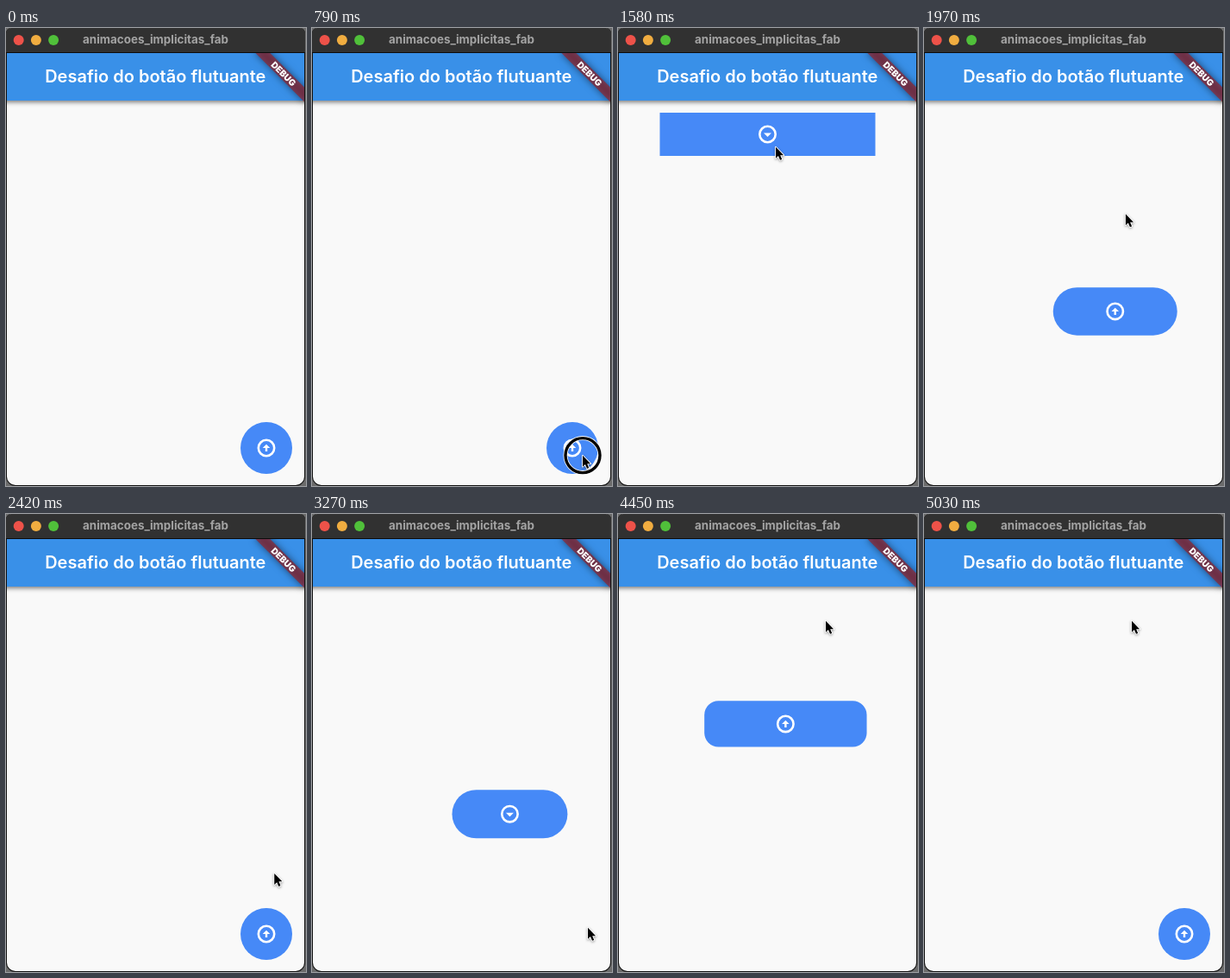
Animation, 348 px wide and 530 px high, one loop 5.06 s. Source, as an HTML page with a canvas:

```html
<!DOCTYPE html>
<html lang="pt">
<head>
<meta charset="utf-8">
<title>Botão flutuante</title>
<style>
  html, body { margin: 0; width: 100%; height: 100%; overflow: hidden; background: #6b6b6b; }
  canvas { display: block; width: 348px; height: 530px; }
</style>
</head>
<body>
<canvas id="stage"></canvas>
<script>
const W = 348, H = 530, LOOP = 5060, MOVE = 450, PRESS = 75;
const BAR = '#3990e8', BUTTON = '#4689f7';

// Each tap: where it lands, when the pointer sets out and arrives, when the button reacts.
const taps = [
  { x: 314, y: 494, leave: 120, arrive: 680, at: 825 },
  { x: 183, y: 137, leave: 1000, arrive: 1540, at: 1720 },
  { x: 320, y: 478, leave: 1850, arrive: 2850, at: 3096 },
  { x: 241, y: 123, leave: 3730, arrive: 4170, at: 4305 }
];
const entry = { x: 352, y: 462 };

const canvas = document.getElementById('stage');
const ctx = canvas.getContext('2d');
const dpr = window.devicePixelRatio || 1;
canvas.width = W * dpr;
canvas.height = H * dpr;

const mix = (a, b, p) => a + (b - a) * p;
const span = (t, a, b) => Math.min(1, Math.max(0, (t - a) / (b - a)));
const easeOut = p => 1 - (1 - p) ** 2;

function disc(x, y, r, color) {
  ctx.fillStyle = color;
  ctx.beginPath();
  ctx.arc(x, y, r, 0, Math.PI * 2);
  ctx.fill();
}

function ring(x, y, r, width, color) {
  ctx.strokeStyle = color;
  ctx.lineWidth = width;
  ctx.beginPath();
  ctx.arc(x, y, r, 0, Math.PI * 2);
  ctx.stroke();
}

function polygon(points) {
  ctx.beginPath();
  points.forEach(([x, y]) => ctx.lineTo(x, y));
  ctx.closePath();
}

function roundRect(x, y, w, h, r) {
  ctx.beginPath();
  ctx.roundRect(x, y, w, h, r);
}

function text(str, x, y, font, color) {
  ctx.font = font + ' Inter, "Open Sans", sans-serif';
  ctx.fillStyle = color;
  ctx.textAlign = 'center';
  ctx.fillText(str, x, y);
}

function shadow(color, blur, dy) {
  ctx.shadowColor = color;
  ctx.shadowBlur = blur * dpr;
  ctx.shadowOffsetY = dy * dpr;
}

function drawTitleBar() {
  ctx.fillStyle = '#313131';
  ctx.fillRect(0, 0, W, 28);
  ctx.fillStyle = '#0c0c0c';
  ctx.fillRect(0, 28, W, 1);
  ['#ee5249', '#f1ad40', '#50c03a'].forEach((color, i) => disc(14.7 + 20.2 * i, 14, 6, color));
  text('animacoes_implicitas_fab', 173.5, 18, '700 13.4px', '#a3a3a3');
}

function drawBanner() {
  ctx.save();
  ctx.translate(346, 29);
  ctx.rotate(Math.PI / 4);
  ctx.save();
  // The strip is drawn off stage so that only its shadow shows.
  const far = 1000;
  shadow('rgba(0,0,0,.5)', 9, 0);
  ctx.shadowOffsetX = far * dpr;
  ctx.translate(-far * Math.SQRT1_2, far * Math.SQRT1_2);
  ctx.fillStyle = '#000';
  ctx.fillRect(-40, 28, 80, 12);
  ctx.restore();
  ctx.fillStyle = 'rgba(155,28,32,.63)';
  ctx.fillRect(-40, 28, 80, 12);
  text('DEBUG', 0, 37.7, '900 10.2px', '#fff');
  ctx.restore();
}

function drawAppBar() {
  ctx.save();
  shadow('rgba(0,0,0,.5)', 5, 2);
  ctx.fillStyle = BAR;
  ctx.fillRect(-8, 29, W + 16, 55);
  ctx.restore();
  text('Desafio do botão flutuante', 173.3, 63, '600 20px', '#fff');
  ctx.save();
  ctx.beginPath();
  ctx.rect(1, 29, 345, H);
  ctx.clip();
  drawBanner();
  ctx.restore();
}

// Every tap flips the button between bottom (0) and top (1).
function buttonState(t) {
  const count = taps.filter(tap => t >= tap.at).length;
  const target = count % 2;
  if (!count) return { p: 0, target };
  const { at } = taps[count - 1];
  return { p: mix(1 - target, target, span(t, at, at + MOVE)), target };
}

function drawButton(t) {
  const { p, target } = buttonState(t);
  const w = mix(60, 250, p), h = mix(60, 50, p);
  // Aligned inside the padded body, from bottom right to top centre.
  const x = 15 + (317 - w) * (1 - p / 2);
  const y = 98 + (418 - h) * (1 - p);
  ctx.fillStyle = BUTTON;
  roundRect(x, y, w, h, Math.min(mix(50, 0, p), h / 2));
  ctx.fill();

  ctx.save();
  ctx.translate(x + w / 2, y + h / 2);
  ring(0, 0, 9.2, 2.6, '#fff');
  ctx.fillStyle = '#fff';
  polygon(target
    ? [[-4.5, -1.5], [4.5, -1.5], [0, 3]]
    : [[1.2, 0], [1.2, 4], [-1.2, 4], [-1.2, 0], [-4.3, 0], [0, -4.3], [4.3, 0]]);
  ctx.fill();
  ctx.restore();
}

// The pointer slows down towards each tap and bows slightly to the right.
function pointerAt(t) {
  const i = Math.max(0, taps.filter(tap => t >= tap.leave).length - 1);
  const from = taps[i - 1] || entry, to = taps[i];
  const p = easeOut(span(t, to.leave, to.arrive));
  const bow = 0.22 * Math.abs(to.x - from.x) * Math.sin(Math.PI * p);
  return [mix(from.x, to.x, p) + bow, mix(from.y, to.y, p)];
}

function drawPointer(t) {
  if (t < taps[0].leave) return;
  const [x, y] = pointerAt(t);
  if (taps.some(({ at }) => t >= at - PRESS && t < at)) {
    ring(x, y + 0.6, 20, 5, '#fff');
    ring(x, y + 0.6, 20, 3.4, '#000');
  }
  ctx.save();
  ctx.translate(x, y + 0.8);
  ctx.scale(0.88, 0.88);
  polygon([[0, 0], [0, 14.6], [3.4, 11.5], [5.7, 17], [8.2, 16], [5.9, 10.6], [10.4, 10.6]]);
  ctx.lineJoin = 'round';
  ctx.lineWidth = 2;
  ctx.strokeStyle = '#fff';
  ctx.save();
  shadow('rgba(0,0,0,.4)', 3, 1);
  ctx.stroke();
  ctx.restore();
  ctx.fillStyle = '#000';
  ctx.fill();
  ctx.restore();
}

function draw(t) {
  ctx.setTransform(dpr, 0, 0, dpr, 0, 0);
  ctx.fillStyle = '#6b6b6b';
  ctx.fillRect(0, 0, W, H);
  ctx.save();
  roundRect(0, 0, 347, H, [6, 6, 11, 11]);
  ctx.fillStyle = '#111';
  ctx.fill();
  ctx.clip();
  ctx.save();
  roundRect(1, 0, 345, 529, [6, 6, 10, 10]);
  ctx.clip();
  ctx.fillStyle = '#f9f9f9';
  ctx.fillRect(0, 0, W, H);
  drawAppBar();
  drawButton(t);
  ctx.restore();
  drawTitleBar();
  ctx.restore();
  drawPointer(t);
}

function tick() {
  draw(performance.now() % LOOP);
  requestAnimationFrame(tick);
}
tick();
</script>
</body>
</html>
```
